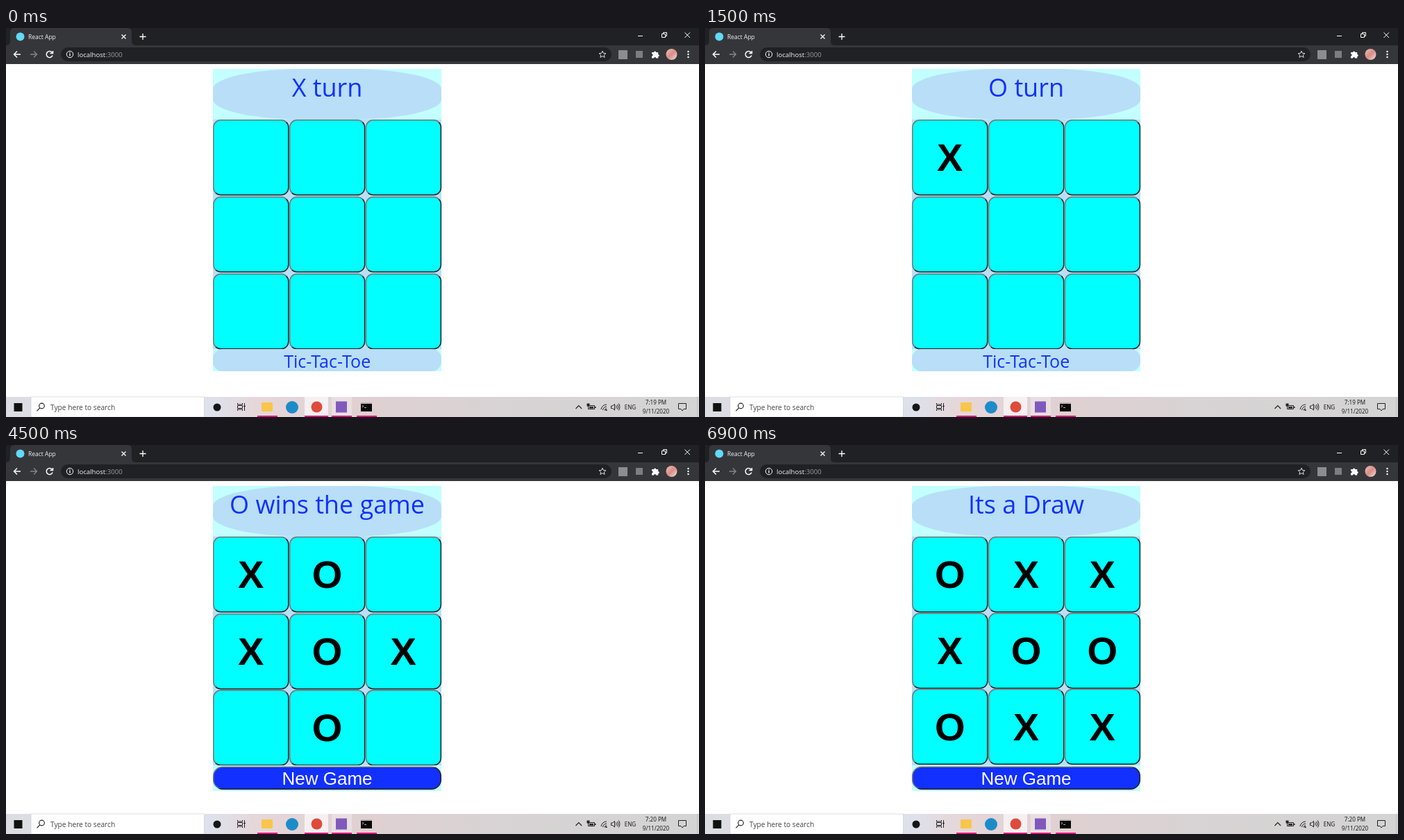
An HTML page that plays this animation: 998 px wide and 561 px high, repeating every 7500 ms.

```html
<!DOCTYPE html>
<html lang="en">
<head>
<meta charset="utf-8">
<title>Tic-Tac-Toe</title>
<style>
  html, body { margin: 0; width: 100%; height: 100%; overflow: hidden; background: #fff; }
  svg { display: block; width: 998px; height: 561px; font-family: "Open Sans", "Noto Sans", sans-serif; }
  .head { fill: #1230ff; font-weight: 500; text-anchor: middle; }
  .arial { font-family: "Liberation Sans", Arial, sans-serif; text-anchor: middle; }
  .mark { font-size: 56px; font-weight: 700; }
  .line { fill: none; stroke: #fff; stroke-width: 1.3; }
  .dark { fill: none; stroke: #222; stroke-width: 1; }
  .small { font-size: 8.1px; fill: #111; text-anchor: middle; }
</style>
</head>
<body>
<svg viewBox="0 0 998 561">
  <defs>
    <linearGradient id="bevel" x1="0" y1="0" x2="1" y2="1">
      <stop offset=".5" stop-color="#767676"/><stop offset=".5" stop-color="#222"/>
    </linearGradient>
    <linearGradient id="bar">
      <stop offset="0" stop-color="#dcdde2"/><stop offset=".3" stop-color="#dee1eb"/>
      <stop offset=".36" stop-color="#e5d7da"/><stop offset=".52" stop-color="#e0d0d2"/>
      <stop offset=".7" stop-color="#d8d3d4"/><stop offset="1" stop-color="#d4d4d4"/>
    </linearGradient>
    <linearGradient id="photo" x1="0" y1="0" x2="1" y2="1">
      <stop offset=".1" stop-color="#e8b9ae"/><stop offset=".5" stop-color="#d98c86"/><stop offset="1" stop-color="#eee3df"/>
    </linearGradient>
  </defs>

  <!-- browser -->
  <rect width="998" height="52" fill="#202124"/>
  <path d="M0 25Q6 25 6 19V6Q6 0 12 0H175Q181 0 181 6V19Q181 25 187 25H998V52H0Z" fill="#35363a"/>
  <rect x="79" y="28" width="793" height="20" rx="10" fill="#202124"/>
  <circle cx="20.5" cy="12.5" r="6" fill="#61dafb"/>
  <text x="32" y="16" font-size="8.5" fill="#f1f3f4">React App</text>
  <g class="line">
    <path d="M166.500 9.500l6 6m0-6l-6 6M192.500 12.500h9m-4.500-4.500v9"/>
    <path d="M910 11.500h7M944.500 8.500h5v5h-5zM946.500 8v-1.500h5v5h-2M977.500 6.500l7.500 7.500m0-7.500l-7.500 7.500" stroke-width="1"/>
    <path d="M21 38H11.500m4.500-4.500l-4.500 4.500 4.500 4.500" stroke-width="1.500"/>
    <path d="M35 38h9.500m-4.500-4.500l4.500 4.500-4.500 4.500" stroke="#85878b"/>
    <path d="M66.500 35.500A4.500 4.500 0 1 0 67 39.500M67.500 33v3.500h-4" stroke-width="1.500"/>
    <circle cx="92" cy="38" r="4.700" stroke-width="1"/>
    <path d="M92 37v3.500M92 35v1.200"/>
    <path d="M859 33.200l1.400 3.200 3.500.3-2.600 2.300.8 3.400-3.100-1.800-3.100 1.800.8-3.400-2.600-2.300 3.500-.3z" stroke-width="1" stroke="#dadce0"/>
  </g>
  <text x="103" y="41.500" font-size="9.600" fill="#f1f3f4">localhost<tspan fill="#9aa0a6">:3000</tspan></text>
  <rect x="882" y="32" width="13" height="13" fill="#8c8d8f"/>
  <rect x="907" y="33" width="10" height="10" fill="#7d7e80"/>
  <path d="M930 35h3a1.600 1.600 0 0 1 3.200 0h3v3a1.600 1.600 0 0 1 0 3.200v2.300h-3a1.600 1.600 0 0 0-3.200 0h-3v-3a1.600 1.600 0 0 0 0-3.200z" fill="#fff"/>
  <circle cx="958.500" cy="38" r="8" fill="url(#photo)"/>
  <g fill="#fff"><circle cx="982.500" cy="34" r="1.200"/><circle cx="982.500" cy="38" r="1.200"/><circle cx="982.500" cy="42" r="1.200"/></g>

  <!-- game -->
  <rect id="panel" x="298" y="59" width="329" height="436" fill="#c3ffff"/>
  <rect x="298" y="59" width="329" height="73" rx="131" ry="29" fill="#b8dff7"/>
  <text id="title" class="head" x="462.500" y="99" font-size="36"></text>
  <rect x="298" y="132" width="329" height="331" fill="#b8dff7"/>
  <g id="board"></g>
  <g id="footer">
    <rect x="298" y="463" width="329" height="32" rx="14" fill="#b8dff7"/>
    <text class="head" x="462.700" y="490" font-size="25">Tic-Tac-Toe</text>
  </g>
  <g id="button">
    <rect x="298" y="462" width="329" height="3" fill="#c3ffff"/>
    <rect x="298.700" y="464.200" width="327.600" height="32" rx="13.500" fill="#1230ff" stroke="url(#bevel)" stroke-width="1.500"/>
    <text class="arial" x="462.500" y="490" font-size="26" fill="#fff">New Game</text>
  </g>

  <!-- taskbar -->
  <rect y="532" width="998" height="29" fill="url(#bar)"/>
  <rect x="36" y="532" width="249.500" height="29" fill="#fff" stroke="#c8c8cc" stroke-width=".6"/>
  <rect x="430" y="532" width="34" height="29" fill="#f5f0f1"/>
  <rect x="469" y="532" width="29" height="29" fill="#e9dfe1"/>
  <path d="M362 560h29M430 560h34M469 560h29M505 560h29" stroke="#e3127e" stroke-width="2"/>
  <rect x="11.500" y="541" width="12" height="12" fill="#111"/>
  <g class="dark">
    <circle cx="51.500" cy="545" r="3.800" stroke-width="1.200"/><path d="M48.800 547.800l-4.300 4.500" stroke-width="1.200"/>
    <path d="M333.500 541v2h7v-2M333.500 552v-2h7v2M333.500 544.500h7v4h-7zM343.500 541v11M342 545.500h3"/>
    <path d="M820.500 549l4.300-4.300 4.300 4.300" stroke-width="1.200"/>
    <path d="M838.500 544.500h9v5h-9z"/>
    <path d="M857 550a8 8 0 0 1 8-7M859.500 551a6 6 0 0 1 5.500-5M862 551.500a3.500 3.500 0 0 1 3-3"/>
    <path d="M871.500 545h2l3-2.500v8.500l-3-2.500h-2zM878.500 544.500q1.500 2 0 4M880.500 543q2.500 3.500 0 7M882.300 541.500q3.200 5 0 10"/>
    <path d="M968.500 541.500h11v8h-3.500l-2 2.500-2-2.500h-3.500z"/>
  </g>
  <path d="M840 546h6v2.500h-6zM836.500 541.500h4v4h-4zM848 546h1.500v2H848zM863.500 550h2v2h-2z" fill="#222"/>
  <text x="64" y="550.500" font-size="10.200" fill="#444">Type here to search</text>
  <circle cx="304" cy="547" r="5.500" fill="#161616"/>
  <rect x="368" y="540" width="16" height="13" rx="1" fill="#f8c64a"/>
  <circle cx="412" cy="547" r="9" fill="#1c8cc8"/>
  <circle cx="447.500" cy="546.500" r="8" fill="#df4b3b"/>
  <rect x="475" y="538.500" width="16" height="16" fill="#8059bd"/>
  <rect x="511" y="540" width="16" height="13" fill="#080808"/>
  <path d="M511 541h16" stroke="#b5b5b5" stroke-width="2"/>
  <path d="M513 544l2 1.500-2 1.500M516 547.500h3" fill="none" stroke="#ddd" stroke-width=".8"/>
  <g class="small">
    <text x="899" y="549.500">ENG</text>
    <text id="clock" x="936" y="543"></text>
    <text x="936" y="556">9/11/2020</text>
  </g>
  <path d="M995.500 532v29" stroke="#b9b9b9" stroke-width=".7"/>
</svg>
<script>
  const HOLD = 1500;
  const CELL = 109;
  const steps = [
    { title: "X turn", marks: "         ", tops: [132, 243, 354], clock: "7:19 PM" },
    { title: "O turn", marks: "X        ", tops: [132, 243, 354], clock: "7:19 PM" },
    { title: "X wins the game", marks: "XOO X   X", tops: [132, 242, 353], clock: "7:19 PM", over: true },
    { title: "O wins the game", marks: "XO XOX O ", tops: [132, 243, 353], clock: "7:20 PM", over: true },
    { title: "Its a Draw", marks: "OXXXOOOXX", tops: [132, 242, 351.5], clock: "7:20 PM", over: true }
  ];

  const byId = id => document.getElementById(id);

  function add(parent, tag, attrs) {
    const el = document.createElementNS("http://www.w3.org/2000/svg", tag);
    for (const key in attrs) el.setAttribute(key, attrs[key]);
    return parent.appendChild(el);
  }

  const cells = Array.from({ length: 9 }, (_, i) => {
    const x = 298 + (i % 3) * 109.8;
    const box = add(byId("board"), "rect", {
      x: x + 0.8, width: CELL - 1, height: CELL - 1, rx: 10.5,
      fill: "#0ff", stroke: "url(#bevel)", "stroke-width": 1.5
    });
    const mark = add(byId("board"), "text", { class: "arial mark", x: x + 54.7 });
    return { box, mark };
  });

  function show(step) {
    byId("title").textContent = step.title;
    byId("clock").textContent = step.clock;
    byId("panel").setAttribute("height", step.over ? 440 : 436);
    byId("footer").style.display = step.over ? "none" : "";
    byId("button").style.display = step.over ? "" : "none";
    cells.forEach(({ box, mark }, i) => {
      const top = step.tops[Math.floor(i / 3)];
      box.setAttribute("y", top + 0.8);
      mark.setAttribute("y", top + 74);
      mark.textContent = step.marks[i].trim();
    });
  }

  let shown;
  function tick() {
    const step = steps[Math.floor(performance.now() / HOLD) % steps.length];
    if (step !== shown) show(shown = step);
    requestAnimationFrame(tick);
  }
  tick();
</script>
</body>
</html>
```
